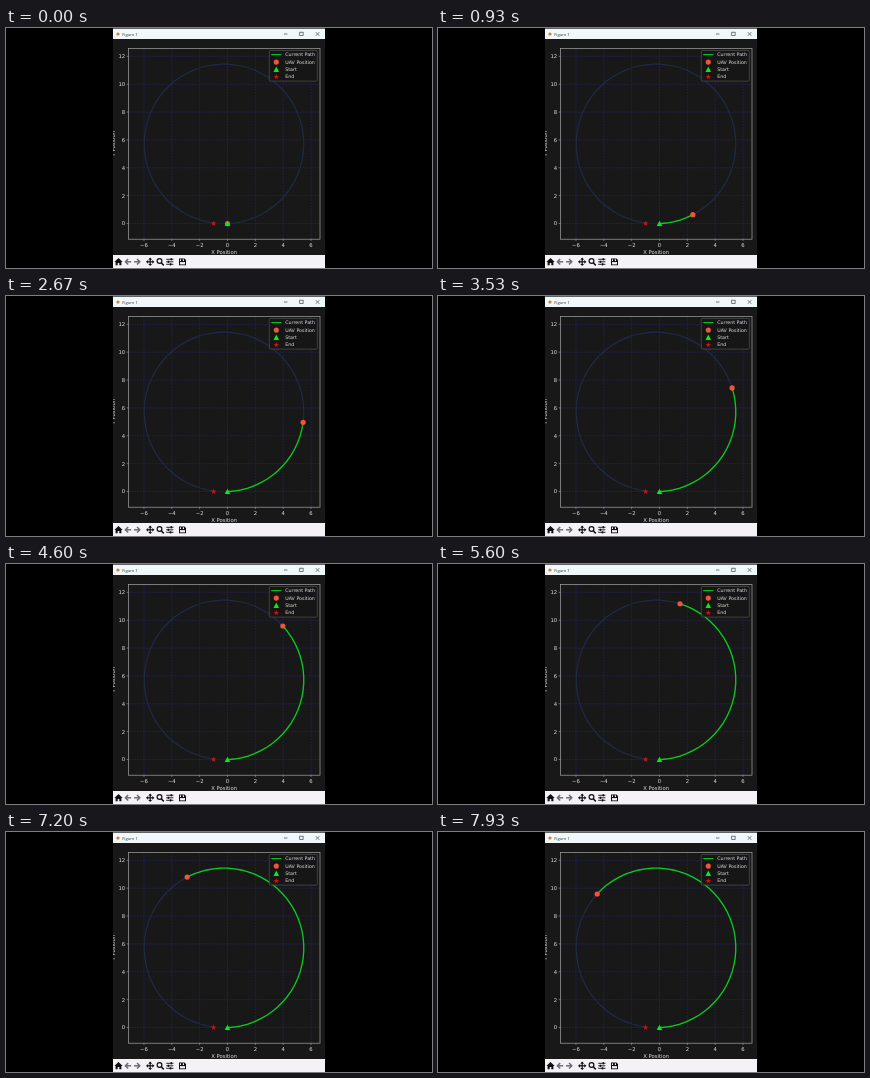
These frames come from a looping animation (426x240 px, 8000 ms). An HTML page with a canvas:

```html
<!DOCTYPE html>
<html lang="en">
<head>
<meta charset="utf-8">
<title>Flight path plot</title>
<style>
  html, body { margin: 0; width: 100%; height: 100%; overflow: hidden; background: #000; }
  canvas { display: block; width: 426px; height: 240px; }
</style>
</head>
<body>
<canvas id="stage"></canvas>
<script>
const W = 426, H = 240, LOOP = 8000;
const canvas = document.getElementById('stage');
const dpr = window.devicePixelRatio || 1;
canvas.width = W * dpr;
canvas.height = H * dpr;
const ctx = canvas.getContext('2d');

const PLOT_FONT = '"DejaVu Sans", sans-serif';
const WIN = { x: 107, y: 0.6, w: 212 };
const AXES = { x: 122.5, y: 20.5, w: 191.5, h: 190.7 };
const RING = { x: 218, y: 115.9, r: 79.8 };
const STEP = 5, FIRST = 2.5, STEPS = 70;
// Plot refresh is uneven: [time in ms, steps flown]
const PACE = [[0, 0], [1800, 11], [3530, 21], [4600, 26], [5600, 32], [7200, 41], [8000, 45.4]];

const px = v => 221.5 + v * 13.92;
const py = v => 195.5 - v * 13.93;

function ringPoint(k) {
  const a = (FIRST + k * STEP) * Math.PI / 180;
  return [RING.x + RING.r * Math.sin(a), RING.y + RING.r * Math.cos(a)];
}

function stepsAt(t) {
  const i = PACE.findIndex(p => p[0] > t);
  const [t0, k0] = PACE[i - 1], [t1, k1] = PACE[i];
  return Math.floor(k0 + (k1 - k0) * (t - t0) / (t1 - t0) + 0.3);
}

function rect(x, y, w, h, color) {
  ctx.fillStyle = color;
  ctx.fillRect(x, y, w, h);
}

function line(points, color, width = 1) {
  ctx.beginPath();
  points.forEach(([x, y]) => ctx.lineTo(x, y));
  ctx.strokeStyle = color;
  ctx.lineWidth = width;
  ctx.stroke();
}

function polygon(points, color) {
  ctx.beginPath();
  points.forEach(([x, y]) => ctx.lineTo(x, y));
  ctx.closePath();
  ctx.fillStyle = color;
  ctx.fill();
}

function dot(x, y, r, color) {
  ctx.beginPath();
  ctx.arc(x, y, r, 0, Math.PI * 2);
  ctx.fillStyle = color;
  ctx.fill();
}

function text(str, x, y, size, align = 'center', color = '#dedede', family = PLOT_FONT) {
  ctx.font = `${size}px ${family}`;
  ctx.textAlign = align;
  ctx.textBaseline = 'alphabetic';
  ctx.fillStyle = color;
  ctx.fillText(str, x, y);
}

function ringPath(n, color, width) {
  line(Array.from({ length: n + 1 }, (_, k) => ringPoint(k)), color, width);
}

const drone = (x, y) => dot(x, y, 2.6, '#f2543a');
const startMark = (x, y) => polygon([[x, y - 2.8], [x + 2.8, y + 2.6], [x - 2.8, y + 2.6]], '#00f010');

function endMark(x, y) {
  const star = Array.from({ length: 10 }, (_, i) => {
    const r = i % 2 ? 1.2 : 2.9, a = i * Math.PI / 5;
    return [x + r * Math.sin(a), y - r * Math.cos(a)];
  });
  polygon(star, '#e00c0c');
}

function titleBar() {
  rect(WIN.x, WIN.y, WIN.w, 11 - WIN.y, '#f0f8f9');
  dot(112, 6, 1.6, '#c8803c');
  text('Figure 1', 116.2, 7.6, 4.2, 'left', '#34383c', '"Open Sans", sans-serif');
  const ink = '#404448';
  line([[278, 6], [281.5, 6]], ink, 0.7);
  ctx.lineWidth = 0.7;
  ctx.strokeRect(293.7, 4.2, 3.4, 3.4);
  line([[309.8, 4.2], [313.4, 7.8]], ink, 0.7);
  line([[313.4, 4.2], [309.8, 7.8]], ink, 0.7);
}

function arrow(x, dir, color) {
  const y = 233.8;
  line([[x - dir * 3, y], [x + dir * 2.6, y]], color, 1.4);
  line([[x, y - 2.8], [x + dir * 2.8, y], [x, y + 2.8]], color, 1.4);
}

function toolbar() {
  const ink = '#101014', paper = '#f4f1f7', y = 233.8;
  rect(WIN.x, 227, WIN.w, 13, paper);

  polygon([[112.5, 230], [116.7, 234], [115.4, 234], [115.4, 237.3], [113.3, 237.3],
    [113.3, 235], [111.7, 235], [111.7, 237.3], [109.6, 237.3], [109.6, 234], [108.3, 234]], ink);
  arrow(122.2, -1, '#66666e');
  arrow(131, 1, '#66666e');

  line([[141, y], [147.4, y]], ink, 1.2);
  line([[144.2, y - 3.2], [144.2, y + 3.2]], ink, 1.2);
  for (let i = 0; i < 4; i++) {
    ctx.save();
    ctx.translate(144.2, y);
    ctx.rotate(i * Math.PI / 2);
    polygon([[0, -4.2], [1.9, -2.1], [-1.9, -2.1]], ink);
    ctx.restore();
  }

  ctx.beginPath();
  ctx.arc(153.5, 233, 2.4, 0, Math.PI * 2);
  ctx.strokeStyle = ink;
  ctx.lineWidth = 1.2;
  ctx.stroke();
  line([[155.2, 234.8], [157.8, 237.4]], ink, 1.5);

  [[-2.5, 1.4], [0, -1.5], [2.5, 0.6]].forEach(([dy, dx]) => {
    line([[160.2, y + dy], [167.4, y + dy]], ink, 0.9);
    rect(163.2 + dx, y + dy - 1.1, 1.5, 2.2, ink);
  });

  polygon([[173, 230.5], [178.5, 230.5], [180, 232], [180, 237.3], [173, 237.3]], ink);
  rect(174, 231.3, 1, 1.7, paper);
  rect(176.8, 231.3, 1.2, 1.7, paper);
  rect(174, 234.1, 5, 2.3, paper);
}

function grid() {
  ctx.setLineDash([1.9, 1]);
  for (let v = -6; v <= 6; v += 2) {
    line([[px(v), AXES.y], [px(v), AXES.y + AXES.h]], '#22225c', 0.8);
    line([[AXES.x, py(v + 6)], [AXES.x + AXES.w, py(v + 6)]], '#22225c', 0.8);
  }
  ctx.setLineDash([]);
}

function frameAndLabels() {
  const edge = '#a4a4a4', bottom = AXES.y + AXES.h;
  ctx.strokeStyle = edge;
  ctx.lineWidth = 0.7;
  ctx.strokeRect(AXES.x, AXES.y, AXES.w, AXES.h);
  for (let v = -6; v <= 6; v += 2) {
    line([[px(v), bottom], [px(v), bottom + 1.8]], edge, 0.6);
    line([[AXES.x - 1.8, py(v + 6)], [AXES.x, py(v + 6)]], edge, 0.6);
    text(String(v).replace('-', '\u2212'), px(v), 218.8, 5.3);
    text(String(v + 6), 119.2, py(v + 6) + 1.9, 5.3, 'right');
  }
  text('X Position', 218.2, 225.7, 5.3);
  ctx.save();
  ctx.beginPath();
  ctx.rect(WIN.x, 11, WIN.w, 216);
  ctx.clip();
  ctx.translate(109.4, 115.7);
  ctx.rotate(-Math.PI / 2);
  text('Y Position', 0, 0, 5.3);
  ctx.restore();
}

function legend() {
  ctx.beginPath();
  ctx.roundRect(263.3, 22.5, 48, 30.6, 1);
  ctx.fillStyle = 'rgba(22,22,22,0.8)';
  ctx.fill();
  ctx.strokeStyle = '#5c5c5c';
  ctx.lineWidth = 0.6;
  ctx.stroke();
  line([[265.2, 26.6], [275.4, 26.6]], '#08cc18', 1.1);
  drone(270.3, 34.1);
  startMark(270.3, 41.4);
  endMark(270.3, 48.9);
  ['Current Path', 'UAV Position', 'Start', 'End'].forEach((s, i) =>
    text(s, 279.2, 28.3 + i * 7.35, 4.75, 'left'));
}

function draw(t) {
  ctx.setTransform(dpr, 0, 0, dpr, 0, 0);
  rect(0, 0, W, H, '#000');
  rect(WIN.x, 11, WIN.w, 216, '#181818');
  titleBar();
  toolbar();
  grid();
  ringPath(STEPS, '#1e2a48', 1.2);

  const k = stepsAt(t);
  if (k > 0) ringPath(k, '#08cc18', 1.3);
  frameAndLabels();
  drone(...ringPoint(k));
  startMark(px(0), py(0));
  endMark(px(-1), py(0));
  legend();
}

function tick() {
  draw(performance.now() % LOOP);
  requestAnimationFrame(tick);
}
tick();
</script>
</body>
</html>
```
